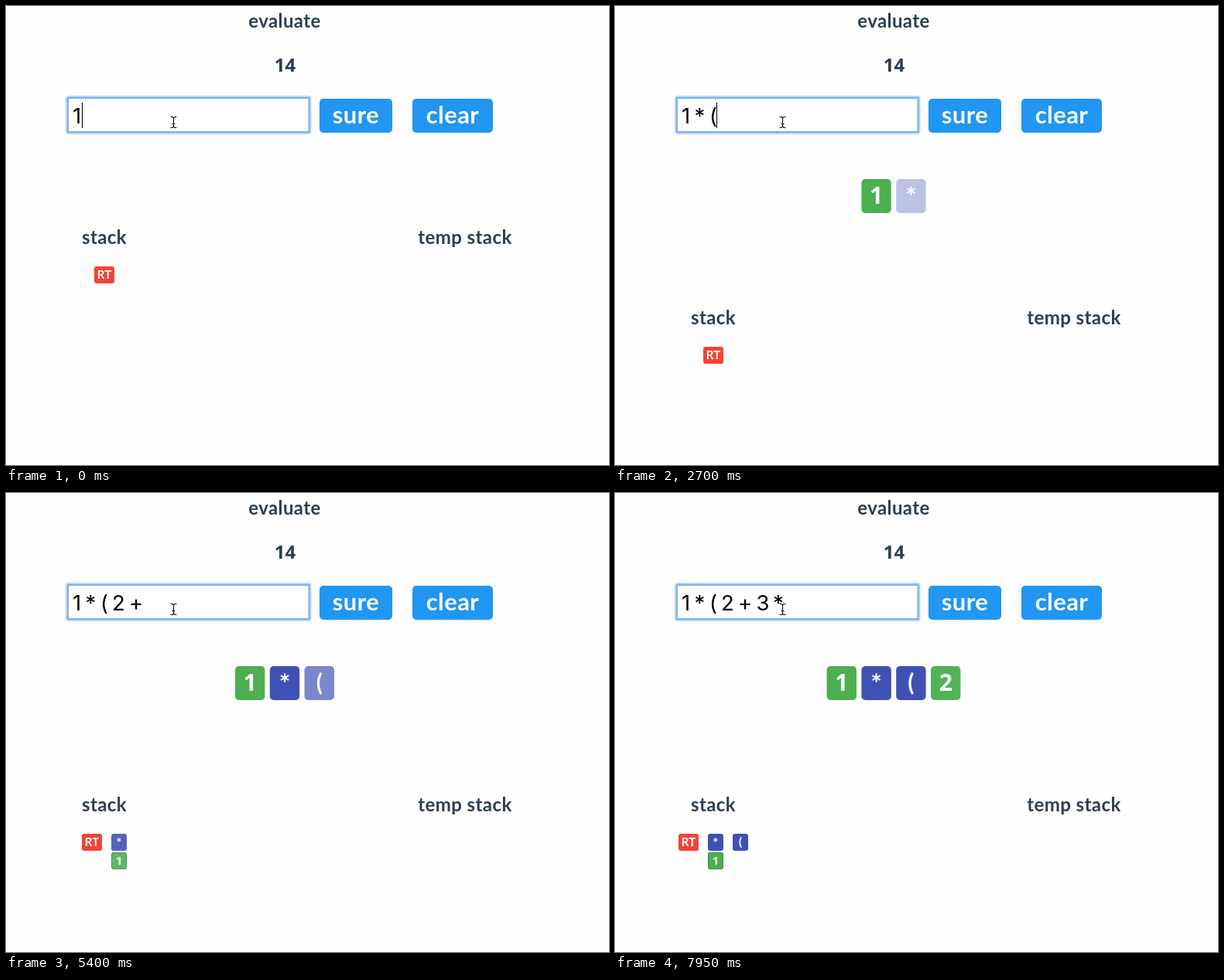
An HTML page that plays this animation: 779x594 px, repeating every 8000 ms.

```html
<!DOCTYPE html>
<html lang="en">
<head>
<meta charset="utf-8">
<title>evaluate</title>
<style>
  html, body { margin: 0; width: 100%; height: 100%; overflow: hidden; background: #fefefe; }
  svg { display: block; }
  text { font: 700 24px Lato, sans-serif; text-anchor: middle; fill: #2c3e50; letter-spacing: .4px; white-space: pre; }
  .button { font-size: 31px; fill: #fff; }
  .token { font-size: 30px; fill: #fff; letter-spacing: 0; }
  .small { font-size: 15px; }
  .digit { font-family: "Open Sans", sans-serif; letter-spacing: 0; }
  .typed { font: 400 27.5px Inter, sans-serif; fill: #000; letter-spacing: 0; }
</style>
</head>
<body>
<svg width="779" height="594" viewBox="0 0 779 594">
  <text x="360" y="28">evaluate</text>
  <text x="360.5" y="85" class="digit">14</text>
  <rect x="79" y="118" width="313.5" height="46" rx="2" fill="#fff" stroke="#b9d6fa" stroke-width="4"/>
  <rect x="80" y="119" width="311.5" height="44" fill="#fff" stroke="#78aff2" stroke-width="2"/>
  <rect x="405" y="120" width="94" height="44" rx="5" fill="#2196f3"/>
  <text x="452" y="152" class="button">sure</text>
  <rect x="525" y="120" width="104" height="44" rx="5" fill="#2196f3"/>
  <text x="577" y="152" class="button">clear</text>
  <g id="scene"></g>
  <path d="M212.5 143.5h2.5l1.5 1.5l1.5-1.5h2.5M212.5 157.5h2.5l1.5-1.5l1.5 1.5h2.5M216.5 145v11M214.5 152.5h4"
        fill="none" stroke="#111" stroke-width="1.2"/>
</svg>
<script>
const scene = document.getElementById('scene');
const LOOP = 8000, STEP = 150;
const GREEN = '#4caf50', INDIGO = '#3f51b5', RED = '#f44336';

const input = '1 * ( 2 + 3 * ';
const keyTimes = [0, 250, 1850, 2150, 2650, 3050, 3400, 3720, 4480, 4700, 5700, 5900, 6750, 7150];
const glyphX = [91.5, 109.5, 127, 145.5, 168, 191, 211];
const caretX = [98.5, 104.5, 115.5, 122.5, 131.5, 137.5, 153.5, 159.5, 177.5, 184.5, 200.5, 206.5, 217.5, 223.5];

const tokens = ['1', '*', '(', '2'];
const tokenTimes = [30, 2020, 4030, 6040];
const FADE = 2000;
const stackTimes = [3000, 5000, 7000];
const STACK_FADE = 450;

const clamp = v => Math.max(0, Math.min(1, v));
const countUpTo = (times, t) => times.filter(start => start <= t).length;
const isDigit = s => /\d/.test(s);
const label = (x, y, s, cls = '', extra = '') => `<text x="${x}" y="${y}" class="${cls}" ${extra}>${s}</text>`;

function tile(x, y, s, small, opacity = 1, outlined = false) {
  const w = small ? (s === 'RT' ? 26 : 20) : 38.4;
  const h = small ? 22 : 44;
  const size = small ? 15 : 30;
  const fill = s === 'RT' ? RED : isDigit(s) ? GREEN : INDIGO;
  const star = s === '*';
  const fontSize = star ? size * 1.15 : size;
  const baseline = y + (small ? 16 : 32) + (star ? size * .1 : 0);
  const cls = `token ${small ? 'small' : ''} ${isDigit(s) ? 'digit' : ''}`;
  const edge = outlined
    ? `<rect x="${x + .5}" y="${y + .5}" width="${w - 1}" height="${h - 1}" rx="2.5" fill="none" stroke="#3f8068"/>` : '';
  return `<g opacity="${opacity}"><rect x="${x}" y="${y}" width="${w}" height="${h}" rx="${small ? 3 : 5}" fill="${fill}"/>${edge}` +
    label(x + w / 2, baseline, s, cls, `style="font-size:${fontSize}px"`) + '</g>';
}

function drawInput(t) {
  const count = countUpTo(keyTimes, t);
  const typed = input.slice(0, count).replace(/ /g, '');
  const caretOn = (t - keyTimes[count - 1]) % 1000 < 500;
  return [...typed].map((c, i) => label(glyphX[i], 152, c, 'typed')).join('') +
    (caretOn ? `<path d="M${caretX[count - 1]} 125v33" stroke="#000"/>` : '');
}

function drawTokens(t) {
  const count = countUpTo(tokenTimes, t);
  const pitch = 44.8;
  const left = 360 - (count * pitch - 6.4) / 2;
  return tokens.slice(0, count)
    .map((s, i) => tile(left + i * pitch, 224, s, false, clamp((t - tokenTimes[i]) / FADE))).join('');
}

function drawStack(t) {
  const top = t >= tokenTimes[0] ? 441 : 337;
  const level = countUpTo(stackTimes, t);
  const fade = level ? clamp((t - stackTimes[level - 1]) / STACK_FADE) : 1;
  const settled = level === 3 ? 1 : fade;
  const rootX = [114, 98, 98, 82][level];
  const column = level === 3 ? 120 : 136;
  let out = label(127, top - 29, 'stack') + label(593, top - 29, 'temp stack') + tile(rootX, top, 'RT', true);
  if (level > 1) out += tile(column, top, '*', true, settled);
  if (level) out += tile(column, level > 1 ? top + 24 : top, '1', true, settled, true);
  if (level > 2) out += tile(152, top, '(', true, fade);
  return out;
}

let shown = -1;
function frame(now) {
  const t = Math.floor(now % LOOP / STEP) * STEP;
  if (t !== shown) {
    shown = t;
    scene.innerHTML = drawInput(t) + drawTokens(t) + drawStack(t);
  }
  requestAnimationFrame(frame);
}
const begin = performance.now();
const tick = () => { frameAt(performance.now() - begin); };
function frameAt(elapsed) { frame(elapsed); }
</script>
<script>
  requestAnimationFrame(frame);
</script>
</body>
</html>
```
